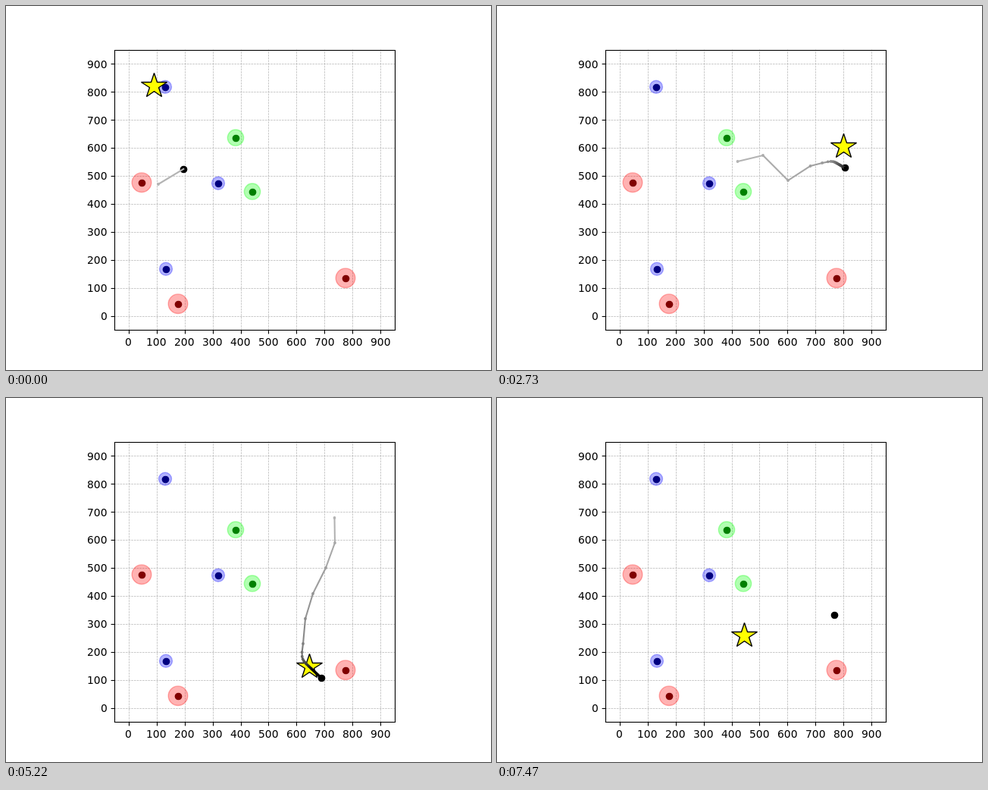
Write an HTML page that moves like this. It is 640 px wide and 480 px high and loops after 7500 ms.

```html
<!DOCTYPE html>
<html lang="en">
<head>
<meta charset="utf-8">
<title>Agent runs</title>
<style>
  html, body { margin: 0; width: 100%; height: 100%; overflow: hidden; background: #fff; }
  svg { display: block; width: 100%; height: 100%; }
  text { font: 13.89px "DejaVu Sans", sans-serif; fill: #000; }
  .grid { stroke: #b0b0b0; stroke-width: .69; stroke-dasharray: 2.57 1.11; }
  .axis { stroke: #000; stroke-width: 1.11; fill: none; }
  .star { fill: #ff0; stroke: #000; stroke-width: 1.39; stroke-linejoin: bevel; }
</style>
</head>
<body>
<svg viewBox="0 0 640 480">
  <g id="axes"></g>
  <g id="zones"></g>
  <path id="star" class="star"/>
  <circle id="agent" r="4.86"/>
  <g id="trail"></g>
</svg>
<script>
const STEP_MS = 30, STEPS = 250, RUN = 50;
const SCALE = 0.3696, STRIDE = 90 * SCALE;
const DOT = 4.86, DIGIT = 8.84;
const byId = id => document.getElementById(id);
const toX = v => 143.2 + SCALE * (v + 50);
const toY = v => 427.2 - SCALE * (v + 50);
const snap = v => Math.round(v) + 0.5;
const stride = d => Math.max(-STRIDE, Math.min(STRIDE, d));

// The agent heads for each point of `via` in turn, then settles at `rest`, which slides to `end`.
const runs = [
  { star: [195.5, 105.5], rest: [181, 125], end: [175, 120],
    via: [[201, 235], [234.3, 215], [301, 281], [334, 255.5], [467.3, 370], [451, 357],
      [351.5, 262], [320, 239], [286.5, 205.5], [279, 234]] },
  { star: [457.5, 185.5], rest: [441, 203], end: [460, 214],
    via: [[317.5, 205], [351, 197], [384, 230], [413.5, 211]] },
  { star: [196.5, 121.5], rest: [182, 138], end: [176, 134],
    via: [[315, 126.5], [481, 293], [468, 326], [453.5, 359], [353.5, 263], [321.3, 240.3], [279, 234]] },
  { star: [400.5, 354.5], rest: [388, 343], end: [417.5, 370.5],
    via: [[433.5, 158], [434, 191], [422, 224], [405, 258], [395, 291], [392, 324]] },
  { star: [302.5, 271.5], rest: [300, 264], end: [305, 280],
    via: [[333.5, 126.5], [430, 226], [434.5, 259.5], [439.5, 292], [452, 326], [443.5, 347],
      [344.5, 253.5], [318.5, 244.5], [284.5, 235.5]] },
  { star: [326.5, 313.5], rest: [445, 286], end: [445, 286], via: [[445, 286]] }
];

function walk({ via, rest, end }) {
  const goals = via.slice(1), points = [via[0]];
  let settling = 0;
  while (points.length < RUN) {
    const from = points[points.length - 1];
    if (goals.length) {
      const near = goals[0].every((g, i) => Math.abs(g - from[i]) < STRIDE + 1.2);
      points.push(near ? goals.shift() : from.map((v, i) => v + stride(goals[0][i] - v)));
    } else {
      const slide = Math.min(1, ++settling / 20);
      points.push(from.map((v, i) =>
        v + stride(0.55 * (rest[i] + (end[i] - rest[i]) * slide - v))));
    }
  }
  return points;
}
runs.forEach(run => run.points = walk(run));

const line = (x1, y1, x2, y2, attrs) =>
  `<line x1="${x1}" y1="${y1}" x2="${x2}" y2="${y2}" ${attrs}/>`;
const label = (x, y, v) => `<text x="${Math.round(x)}" y="${Math.round(y)}">${v}</text>`;

function drawAxes() {
  let grid = '', marks = '';
  for (let v = 0; v < 1000; v += 100) {
    const x = snap(toX(v)), y = snap(toY(v)), width = DIGIT * String(v).length;
    grid += line(x, 427.2, x, 57.6, 'class="grid"') + line(143.2, y, 512.8, y, 'class="grid"');
    marks += line(x, 427.5, x, 432.4, 'class="axis"') + line(143.5, y, 138.6, y, 'class="axis"');
    marks += label(toX(v) - width / 2, 448, v) + label(133.5 - width, toY(v) + 5.51, v);
  }
  byId('axes').innerHTML = grid + marks +
    '<rect x="143.5" y="58.5" width="370" height="369" class="axis"/>';
}

function drawZones() {
  const kinds = [
    { halo: '#f00', core: '#800000', at: [[179, 233], [227, 393], [448, 359]] },
    { halo: '#0f0', core: '#008000', at: [[303, 174], [325, 245]] },
    { halo: '#00f', core: '#000080', at: [[210, 107], [280, 234], [211, 347]] }
  ];
  byId('zones').innerHTML = kinds.map(({ halo, core, at }, i) => at.map(([x, y]) =>
    `<circle cx="${x}" cy="${y - 0.3}" r="${12.8 - 2.15 * i}" fill="${halo}" fill-opacity=".3"
      stroke="${halo}" stroke-opacity=".3" stroke-width="1.39"/>
    <circle cx="${x + 0.5}" cy="${y + 0.5}" r="${DOT}" fill="${core}"/>`).join('')).join('');
}

function drawStar() {
  const corners = Array.from({ length: 10 }, (_, i) => {
    const r = i % 2 ? 17.36 * 0.381966 : 17.36, a = i * Math.PI / 5;
    return [r * Math.sin(a), -r * Math.cos(a)].map(Math.round).join(' ');
  });
  byId('star').setAttribute('d', `M${corners.join('L')}Z`);
}

function drawStep(step) {
  const { star, points } = runs[Math.floor((step + 1) / RUN)];
  const last = (step + 1) % RUN;
  let trail = '';
  for (let i = 0; i < last; i++) {
    const [x, y] = points[i], [nx, ny] = points[i + 1];
    const level = Math.round(255 * Math.max(0, 0.7 - i / last));
    const color = `rgb(${level},${level},${level})`;
    trail += line(x, y, nx, ny, `stroke="${color}" stroke-width="2.08" stroke-linecap="square"`) +
      `<circle cx="${x}" cy="${y}" r="1.9" fill="${color}"/>`;
  }
  byId('trail').innerHTML = trail;
  byId('star').setAttribute('transform', `translate(${star})`);
  const [ax, ay] = points[last];
  byId('agent').setAttribute('cx', Math.floor(ax) + 0.5);
  byId('agent').setAttribute('cy', Math.floor(ay) + 0.5);
}

drawAxes();
drawZones();
drawStar();

const began = performance.now();
let shown = -1;
function tick() {
  const step = Math.floor((performance.now() - began) / STEP_MS) % STEPS;
  if (step !== shown) drawStep(shown = step);
  requestAnimationFrame(tick);
}
tick();
</script>
</body>
</html>
```
